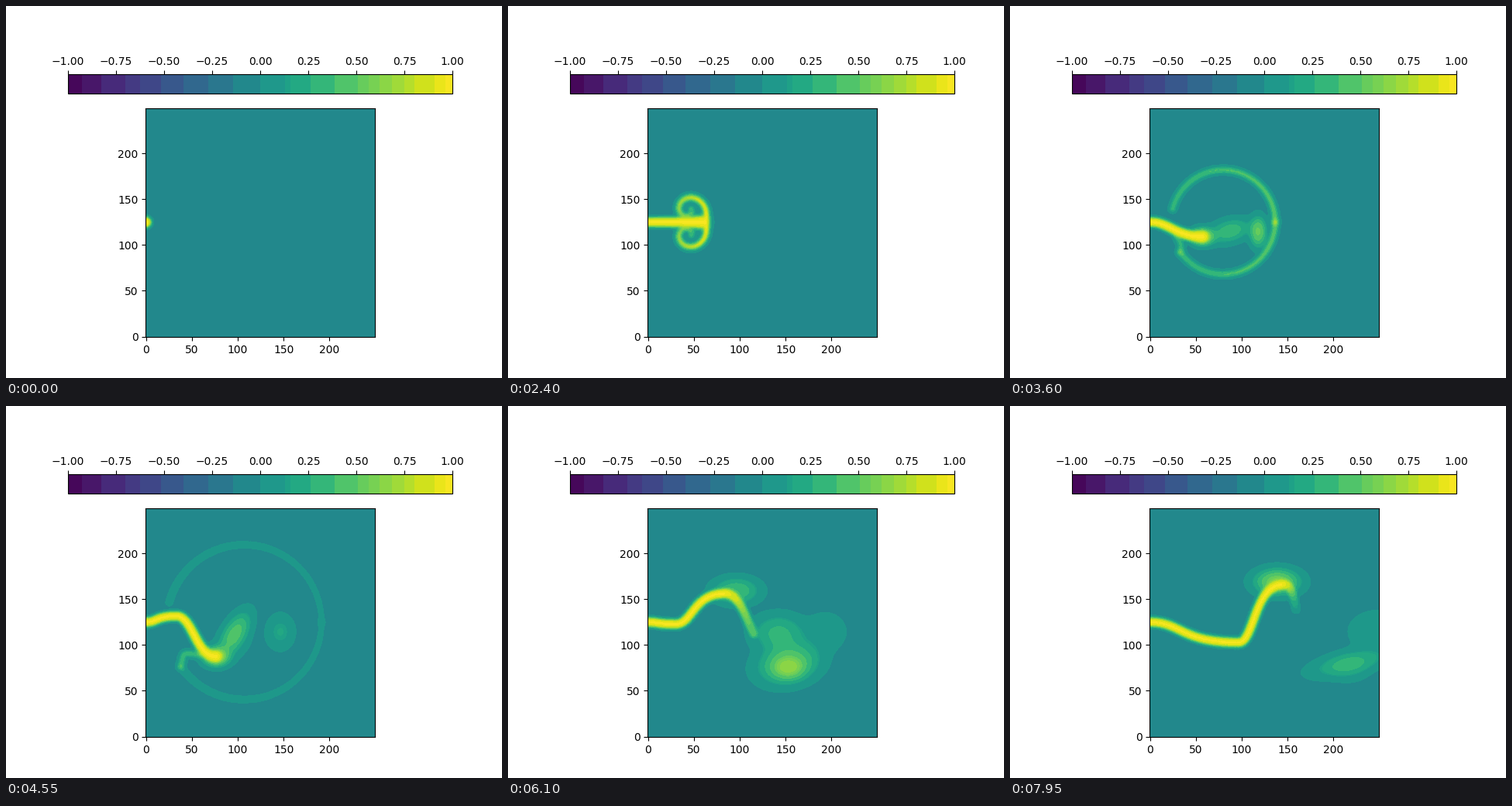
Write a matplotlib script that moves like this. It is 640 px wide and 480 px high and loops after 8000 ms.

```python
import numpy as np
import matplotlib.pyplot as plt
from matplotlib.animation import FuncAnimation
from matplotlib.colors import ListedColormap

FRAMES, STEP = 160, 50
SIZE, CELLS = 250, 167
MID = 124.6

axis = (np.arange(CELLS) + 0.5) * SIZE / CELLS - 0.5
ROWS = slice(18, 148)
X, Y = np.meshgrid(axis.astype(np.float32), axis[ROWS].astype(np.float32))
GRID = np.column_stack([X.ravel(), Y.ravel()])
GRID_SQ = (GRID ** 2).sum(axis=1)


def ease(u):
    u = np.clip(u, 0, 1)
    return u * u * (3 - 2 * u)


def bump(s, peak, spread):
    return np.exp(-((s - peak) / spread) ** 2)


def mix(a, b, u):
    return a + (b - a) * u


def bezier(p0, out, into, p1, n=40):
    """Curve from p0 to p1; out and into are handles relative to the ends."""
    u = np.linspace(0, 1, n)[:, None]
    c0, c1 = p0 + out, p1 + into
    return ((1 - u) ** 3 * p0 + 3 * u * (1 - u) ** 2 * c0
            + 3 * u ** 2 * (1 - u) * c1 + u ** 3 * p1)


def rise(p0, p1):
    """S-curve between two turning points, level at both."""
    dx = p1[0] - p0[0]
    return bezier(p0, np.array([0.35 * dx, 0]), np.array([-0.65 * dx, 0]), p1)


def ribbon(points, width, amp, power=2, count=84):
    """Soft stroke; width and amp may vary from start to end."""
    n = len(points)
    c = np.column_stack([points, np.broadcast_to(width, n), np.broadcast_to(amp, n)])
    gap = np.hypot(*np.diff(points, axis=0).T)
    length = np.r_[0, np.cumsum(gap + 1e-6)]
    even = np.linspace(0, length[-1], count)
    c = np.column_stack([np.interp(even, length, col) for col in c.T]).astype(np.float32)
    dist = GRID @ (-2 * c[:, :2].T)
    dist += GRID_SQ[:, None]
    dist += (c[:, :2] ** 2).sum(axis=1)
    dist /= c[:, 2] ** 2
    near = dist.argmin(axis=1)
    q = np.maximum(dist[np.arange(len(near)), near], 0)
    return (c[near, 3] * np.exp(-q ** (power / 2))).reshape(X.shape)


def cloud(centre, rx, ry, amp, turn=0):
    c, s = np.cos(np.radians(turn)), np.sin(np.radians(turn))
    dx, dy = X - centre[0], Y - centre[1]
    r2 = ((dx * c + dy * s) / rx) ** 2 + ((dy * c - dx * s) / ry) ** 2
    return amp * np.exp(-r2 ** 1.3)


def ring_half(s, side, last):
    """Rolled-up vortex that opens into one half of an expanding ring."""
    grow = max(s - 2.4, 0)
    radius = 22 * np.sqrt(min(s / 2.4, 1)) + 29 * grow
    centre = np.array([18.8 * s + 10 * grow, MID])
    u = np.linspace(0, 1, 60)
    roll = np.radians(mix(-34, 377, u))
    rho = 0.2 + 0.85 * (1 - u) ** 2
    spiral = np.column_stack([rho * np.cos(roll) - 0.1, rho * np.sin(roll) + 0.58])
    turn = np.radians(last * u)
    arc = np.column_stack([np.cos(turn), np.sin(turn)])
    shape = mix(spiral, arc, ease(grow))
    fade = np.clip((5.1 - s) / 1.5, 0, 1)
    front = np.clip((5 - s) / 2.6, 0, 1)
    return centre + radius * shape * (1, side), mix(front, 0.37, u) * fade


def field(s):
    # Turning points of the meander drift downstream and swing out
    nozzle = np.array([0, MID])
    cx = max(33 * (s - 3.55), 0)
    crest = np.array([cx, MID + 45 * (1 - np.exp(-max(cx - 25, 0) / 50))])
    tx = max(30 + 36 * (s - 6.1), 0)
    trough = np.array([tx, MID - 0.3 * max(tx - 23, 0)])
    core = np.array([57 + 160 * ease((s - 3.6) / 4.4), MID - 50 * ease((s - 2.4) / 3.2)])

    upper, amp_up = ring_half(s, 1, 165)
    lower, amp_low = ring_half(s, -1, 145)
    core[0] = min(core[0], upper[0, 0])

    # The tail lets go of the core and hangs below the crest
    free = ease((s - 4.8) / 2.05)
    tip = mix(core, crest + (14, -27), free)
    reach = tip[0] - crest[0]
    hook = mix(np.array([-0.5 * reach, 0]), np.array([-4, 22]), free)
    tail = bezier(crest, np.array([min(18, reach / 2), 0]), hook, tip)
    body = np.vstack([rise(nozzle, trough), rise(trough, crest)])
    u = np.r_[np.zeros(len(body)), np.linspace(0, 1, len(tail))]
    jet = np.vstack([body, tail])

    layers = [ribbon(jet, mix(5.7, mix(6.3, 4.5, free), u),
                     mix(1, mix(1, 0.15, free), u), power=3.6)]
    if s < 5.1:
        width = 3.8 if s > 2.4 else mix(2.8, 4, s / 2.4)
        layers += [ribbon(upper, width, amp_up), ribbon(lower, width, amp_low)]

    side = bump(s, 4.1, 0.65)
    if side > 0.03:
        arm = bezier(lower[-1], np.array([4, 16]), np.array([-20, 2]), tip - (18, -2))
        layers.append(ribbon(arm, 4, 0.6 * side))

    # Dye shed ahead of the jet
    age = max(s - 3.6, 0)
    start = ease((s - 2.4) / 1.2)
    swing = bump(s, 4.6, 0.6)
    plume = core + (30 * (1 - ease(age / 2.5)), 5 + 19 * swing)
    lobe = np.array([118 + 30 * age, 114])
    if s < 3.6:
        plume, lobe = mix(core, plume, start), mix(upper[0], lobe, start)
    layers += [
        cloud(core, 5 + 2 * s, 5 + 1.2 * s, 0.85 * bump(s, 3.6, 3) * ease(s / 2)),
        cloud(plume, 22 + 4 * age, 12 + 9 * bump(s, 6.1, 0.9),
              0.52 * bump(s, 5.5, 3.2) * start, 12 + 48 * swing),
        cloud(lobe, 9 + 5 * age, 16 + 1.5 * age,
              (0.1 + 0.45 * np.exp(-age / 0.6)) * start),
        cloud(mix(tip, lobe, 0.35), 27, 19, 0.32 * bump(s, 6, 0.9)),
        cloud(crest + (12 - 10 * (s - 6.1), 3), 24, 14, 0.62 * ease((s - 4.6) / 2.6)),
    ]

    rest = np.prod([1 - layer for layer in layers], axis=0)
    out = np.full((CELLS, CELLS), -0.03)
    out[ROWS] = 0.97 - rest
    return out


# Viridis in coarse bands; edges in pixels along the bar
BAR = 496
EDGES = np.array([0, 18, 43, 74, 93, 120, 149, 181, 213, 248, 280, 287, 313, 344,
                  374, 388, 402, 418, 434, 447, 473, 487, BAR])
bands = plt.get_cmap("viridis")((EDGES[:-1] + EDGES[1:]) / (2 * BAR))
bands[8, :3] = np.array([34, 136, 140]) / 255
cmap = ListedColormap(bands[np.searchsorted(EDGES, np.arange(BAR) + 0.5) - 1])

fig, ax = plt.subplots(figsize=(6.4, 4.8), dpi=100)
image = ax.imshow(field(0), cmap=cmap, vmin=-1, vmax=1, origin="lower",
                  extent=(-0.5, SIZE - 0.5, -0.5, SIZE - 0.5), interpolation="bilinear")
ax.set_xticks(range(0, 201, 50))
ax.set_yticks(range(0, 201, 50))
fig.colorbar(image, ax=ax, location="top")


def draw(i):
    image.set_data(field(i * STEP / 1000))
    return [image]


anim = FuncAnimation(fig, draw, frames=FRAMES, interval=STEP, repeat=True, repeat_delay=0)
plt.show()
```
